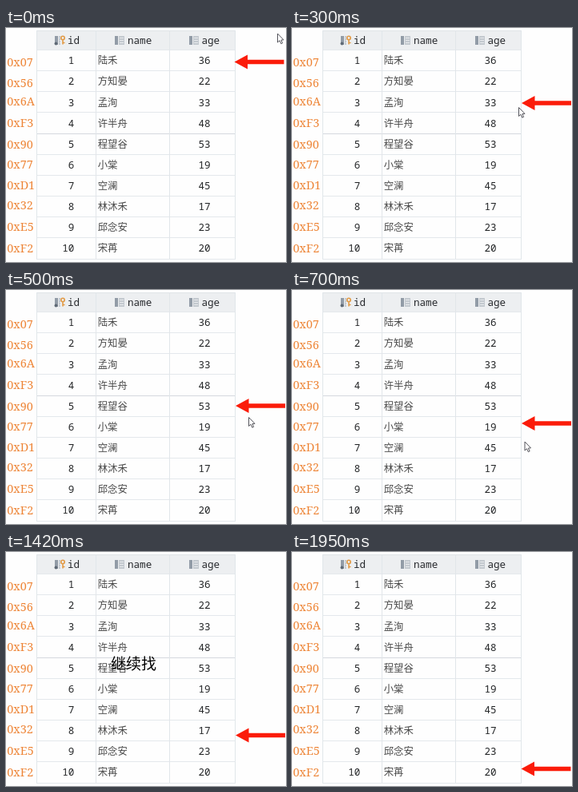
Recreate the animation shown at these times as an HTML page with a canvas. Size 350x293 px, loop 2.05 s.

```html
<!DOCTYPE html>
<html lang="zh-CN">
<head>
<meta charset="utf-8">
<title>全表扫描</title>
<style>
html, body { margin: 0; width: 100%; height: 100%; overflow: hidden; background: #fefefe; }
canvas { display: block; }
</style>
</head>
<body>
<canvas id="stage" width="350" height="293"></canvas>
<script>
const ctx = document.getElementById('stage').getContext('2d');
const LOOP = 2050;
const MONO = '500 12.6px "Noto Sans Mono", "DejaVu Sans Mono", monospace';
const SERIF = '14.4px "Noto Serif", serif';
const CJK = '"Noto Sans CJK SC", "Noto Sans CJK", sans-serif';

const rows = [
  ['0x07', 43, '陆禾', 36],
  ['0x56', 69, '方知晏', 22],
  ['0x6A', 92, '孟洵', 33],
  ['0xF3', 119, '许半舟', 48],
  ['0x90', 146, '程望谷', 53],
  ['0x77', 171, '小棠', 19],
  ['0xD1', 197, '空澜', 45],
  ['0x32', 222, '林沐禾', 17],
  ['0xE5', 249, '邱念安', 23],
  ['0xF2', 276, '宋苒', 20]
];

// One scan step per row: start time, arrow tip, pointer tip, caption
const steps = [
  { at: 0, x: 285.5, y: 42.5, pointer: [339, 6.5] },
  { at: 200, x: 287, y: 67, pointer: [249.5, 69.5] },
  { at: 300, x: 287, y: 94, pointer: [283, 99] },
  { at: 400, x: 286.5, y: 121, pointer: [315.5, 127.5] },
  { at: 500, x: 287, y: 145, pointer: [303, 159] },
  { at: 700, x: 287, y: 167, pointer: [290.5, 189.5] },
  { at: 800, x: 287, y: 197, pointer: [254, 204], caption: ['找到目标', 147] },
  { at: 1420, x: 287, y: 229.5, caption: ['继续找', 139.5] },
  { at: 1750, x: 287, y: 249 },
  { at: 1950, x: 286.5, y: 271.5 }
];

function rect(x, y, w, h, color) {
  ctx.fillStyle = color;
  ctx.fillRect(x, y, w, h);
}

// Text whose capitals or ideographs are centred on y
function label(str, x, y, font, color, rise, align = 'left') {
  ctx.font = font;
  ctx.fillStyle = color;
  ctx.textAlign = align;
  ctx.fillText(str, x, y + rise);
}

function poly(points, x, y) {
  ctx.beginPath();
  for (const [px, py] of points) ctx.lineTo(x + px, y + py);
  ctx.closePath();
}

function gridIcon(x, y) {
  rect(x, y, 12, 11, '#c3c9cf');
  rect(x, y, 4, 11, '#929ca7');
  rect(x + 4, y, 1, 11, '#eeeff1');
  for (let r = 0; r < 3; r++) rect(x + 6, y + 2 + r * 3, 5, 1, '#e8eaed');
}

function keyIcon(x, y) {
  ctx.strokeStyle = '#e29a45';
  ctx.lineWidth = 1.6;
  ctx.beginPath();
  ctx.arc(x, y, 2.2, 0, Math.PI * 2);
  ctx.moveTo(x, y + 2);
  ctx.lineTo(x, y + 8);
  ctx.moveTo(x, y + 6);
  ctx.lineTo(x + 2.5, y + 6);
  ctx.stroke();
}

function table() {
  rect(0, 0, 350, 293, '#fefefe');
  rect(38, 3, 249, 24, '#edeff1');
  for (let i = 0; i <= 10; i++) {
    rect(38, Math.round(27 + i * 26.15), 249, 1, i === 4 ? '#d5d9df' : '#e4e8ec');
  }
  rect(38, 3, 249, 1, '#dfe3e7');
  for (const x of [38, 112, 204, 286]) rect(x, 3, 1, 286, '#e1e6ea');

  gridIcon(61, 10);
  rect(68, 9, 6, 13, '#edeff1');
  keyIcon(71, 12.5);
  ctx.fillStyle = '#5f6a76';
  ctx.beginPath();
  ctx.arc(62.5, 19.5, 2, 0, Math.PI * 2);
  ctx.fill();
  gridIcon(136, 10);
  gridIcon(229, 10);
  label('id', 77, 15.5, MONO, '#26282c', 4.5);
  label('name', 152, 15.5, MONO, '#26282c', 4.5);
  label('age', 244.5, 15.5, MONO, '#26282c', 4.5);

  rows.forEach(([addr, addrY, name, age], i) => {
    const y = 40.7 + i * 26.1;
    label(addr, 1.3, addrY, SERIF, '#ee8638', 5.2);
    label(i + 1, 85.3, y, MONO, '#222426', 4.6, 'right');
    label(name, 114.7, y, '300 12.4px ' + CJK, '#484848', 4.6);
    label(age, 248, y, MONO, '#222426', 4.6, 'center');
  });
}

function arrow(x, y) {
  poly([[0, 0], [16.5, -9], [16.5, -2.7], [62, -2.7], [62, 2.7], [16.5, 2.7], [16.5, 9]], x, y);
  ctx.fillStyle = '#fb1c0a';
  ctx.fill();
}

function pointer(x, y) {
  poly([[0.5, 0.5], [0.5, 11.5], [3, 9.2], [4.8, 13.2], [6.6, 12.4], [4.9, 8.6], [8, 8.3]], x, y);
  ctx.fillStyle = '#fff';
  ctx.fill();
  ctx.strokeStyle = '#55555c';
  ctx.lineWidth = 1;
  ctx.stroke();
}

function draw(t) {
  const step = steps.filter(s => s.at <= t).pop();
  table();
  arrow(step.x, step.y);
  if (step.caption) {
    const [str, y] = step.caption;
    label(str, 131, y, '500 19px ' + CJK, '#000', 7.2);
  }
  if (step.pointer) pointer(...step.pointer);
}

function tick() {
  draw(performance.now() % LOOP);
  requestAnimationFrame(tick);
}
tick();
</script>
</body>
</html>
```
